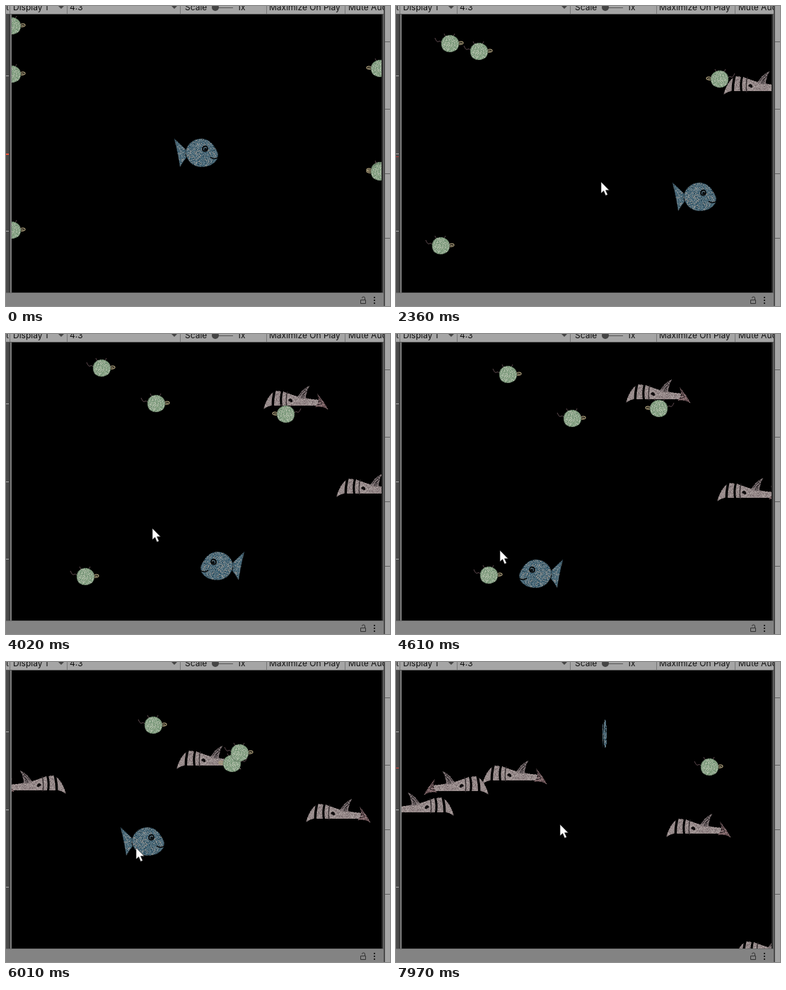
Write an HTML page with a canvas that moves like this. It is 543 by 423 pixels and loops after 8000 ms.

```html
<!DOCTYPE html>
<html lang="en">
<head>
<meta charset="utf-8">
<title>Fish game</title>
<style>
html, body { margin: 0; width: 100%; height: 100%; overflow: hidden; background: #000; }
canvas { display: block; }
</style>
</head>
<body>
<canvas id="stage" width="543" height="423"></canvas>
<script>
const ctx = document.getElementById('stage').getContext('2d');
const LOOP = 8000;
const LEFT = 8, TOP = 12, RIGHT = 531, BOTTOM = 404;

let seed = 7;
const random = () => (seed = seed * 16807 % 2147483647) / 2147483647;

function sprite(draw) {
  const canvas = document.createElement('canvas');
  canvas.width = 110;
  canvas.height = 60;
  const g = canvas.getContext('2d');
  g.translate(55, 30);
  draw(g);
  return canvas;
}

function stroke(g, path, color, width = 1) {
  g.strokeStyle = color;
  g.lineWidth = width;
  g.stroke(new Path2D(path));
}

function fill(g, path, color) {
  g.fillStyle = color;
  g.fill(new Path2D(path));
}

// Fills a path with a base colour and a fine crayon grain.
function crayon(g, path, base, tones) {
  g.save();
  g.clip(new Path2D(path));
  fill(g, path, base);
  for (let i = 0; i < 4000; i++) {
    g.fillStyle = tones[i % tones.length];
    g.fillRect(Math.floor(random() * 110 - 55), Math.floor(random() * 60 - 30), 1, 1);
  }
  g.restore();
}

// Faces right.
const turtle = sprite(g => {
  const shell = 'M-12 0C-12-7-7-12 0-12S13-7 13 0 8 12 0 12-12 7-12 0Z';
  stroke(g, 'M-11-1Q-14-5-16-3T-21-8M-6-10L-8-14M5-10L7-14', '#5d494e');
  stroke(g, 'M11-1C14-4 19-3 19-1S14 2 11 1M13-.5H17', '#a89b78', 1.2);
  crayon(g, shell, '#8aa388', ['#b3c3ac', '#678a6b', '#a0b49b', '#7d9b78', '#bbbfb0']);
  stroke(g, shell, 'rgba(45, 65, 48, .45)');
});

// Faces right.
const fish = sprite(g => {
  const tones = ['#2f5266', '#7d8f96', '#3d6375', '#8c9293', '#22404f', '#969089'];
  const tail = 'M-31-20Q-20-10-14-4Q-16 2-14 7Q-19 13-23 20Q-26 0-31-20Z';
  const body = 'M-15-1C-14-11-5-20 7-20C18-20 25-12 30-1Q32 4 29 10C24 17 17 20 7 20C-5 20-14 11-15-1Z';
  for (const part of [tail, body]) {
    crayon(g, part, '#4f6c7a', tones);
    stroke(g, part, 'rgba(12, 25, 32, .5)');
  }
  stroke(g, 'M20 6Q24 10 30 7', '#05080a', 1.6);
  stroke(g, 'M9-5C9-10 16-11 16-6S9-1 9-5Z', '#080b0d', 1.8);
  fill(g, 'M11-5a2 2 0 0 1 4 0a2 2 0 0 1-4 0Z', '#080b0d');
});

// Faces left.
const shark = sprite(g => {
  const tones = ['#a99d9c', '#857779', '#b1a7a4', '#928183', '#6f6365'];
  crayon(g, 'M-46 16Q-41-2-30-10L-18-9Q2 0 32 3L31 11H-33Q-39 11-46 16Z', '#968a8a', tones);
  crayon(g, 'M2-1Q8-12 19-17Q14-8 14 2Z', '#756a6c', ['#8d8283', '#302b2d']);
  crayon(g, 'M30-6Q38 3 46 17Q38 11 27 13L33 5Z', '#735b5e', ['#8f7174', '#3c2c2f', '#9d8789']);
  stroke(g, 'M5-3L15-14M8-1L15-10M32-2L37 8L30 10', '#262022');
  stroke(g, 'M-30-12Q-33 2-33 15', '#000', 3.5);
  stroke(g, 'M-19-11Q-23 1-20 14', '#000', 3);
  stroke(g, 'M-12-9Q-15 1-13 13', '#2a2425', 1.2);
  fill(g, 'M-11 3Q-8-1-5 3Q-4 7-7 6T-11 3Z', '#100d0e');
});

// Smooth curve through values at the given times, held at both ends.
function curve(times, values) {
  const last = times.length - 1;
  const slope = i => {
    const p = Math.max(0, i - 1), n = Math.min(last, i + 1);
    return (values[n] - values[p]) / (times[n] - times[p]);
  };
  return t => {
    if (t <= times[0]) return values[0];
    if (t >= times[last]) return values[last];
    const i = times.findIndex(k => k > t) - 1;
    const span = times[i + 1] - times[i], u = (t - times[i]) / span;
    const m = slope(i) * span, n = slope(i + 1) * span, d = values[i + 1] - values[i];
    return values[i] + u * (m + u * (3 * d - 2 * m - n + u * (m + n - 2 * d)));
  };
}

// Game time advances in small visible steps between these beats.
const BEATS = [430, 1450, 3330, 4610, 6010, 6830, 7970];
const START = BEATS[0];
function stepped(t) {
  if (t < 500) return START;
  const marks = [...BEATS, LOOP];
  const i = marks.findIndex(k => k > t);
  const a = marks[i - 1], span = marks[i] - a;
  const step = span / Math.max(1, Math.round(span / 73));
  return a + Math.floor((t - a) / step + 1e-6) * step;
}

const fishTimes = [START, 1450, 2500, 3330, 4610, 5250, 6010, 6830, 7500, 7970];
const fishX = curve(fishTimes, [269, 282, 440, 401, 205, 152, 193, 278, 292, 295]);
const fishY = curve(fishTimes, [207, 215, 280, 311, 338, 332, 253, 197, 84, 101]);
const turnTimes = [2600, 5180, 7830];

const pointerFrom = 950;
const pointerX = curve(BEATS.slice(1), [291, 272, 147, 184, 217, 232]);
const pointerY = curve(BEATS.slice(1), [265, 241, 305, 262, 223, 229]);

// Swims in from one side at constant speed (px/s), passing a height on each beat.
function swimmer(image, dir, born, speed, heights) {
  const edge = dir > 0 ? LEFT : RIGHT - 2;
  const beats = BEATS.filter(b => b >= born).slice(0, heights.length);
  const x = t => edge + dir * speed * (t - born) / 1000;
  const y = curve(beats, heights);
  let end = LOOP;
  if (image === turtle) {
    // The fish eats any turtle it reaches.
    for (let t = LOOP; t >= born; t -= 10) {
      if (Math.hypot(x(t) - fishX(t), y(t) - fishY(t)) < 36) end = t;
    }
  }
  return { image, born, end, x, y, flip: image === turtle ? dir : -dir };
}

const swimmers = [
  swimmer(shark, -1, 1990, 60.3, [109, 81, 135, 99, 156]),
  swimmer(shark, -1, 3230, 21.3, [205, 220, 210, 211, 231]),
  swimmer(shark, 1, 4690, 23.5, [170, 155, 171]),
  swimmer(shark, 1, 7200, 36, [201]),
  swimmer(shark, -1, 7780, 26, [404]),
  swimmer(turtle, -1, START, 37.5, [88, 85, 122, 105, 143, 115]),
  swimmer(turtle, -1, START, 58.8, [232, 249]),
  swimmer(turtle, -1, START, 53, [234, 290]),
  swimmer(turtle, 1, START, 29.4, [316, 332, 342, 340]),
  swimmer(turtle, 1, START, 35.9, [28, 57, 44, 57, 89, 62]),
  swimmer(turtle, 1, START, 57.7, [96, 63, 77, 119, 128, 162, 148])
];

function place(image, x, y, scaleX) {
  ctx.save();
  ctx.translate(Math.round(x), Math.round(y));
  ctx.scale(scaleX, 1);
  ctx.drawImage(image, -55, -30);
  ctx.restore();
}

function rect(color, x, y, w, h) {
  ctx.fillStyle = color;
  ctx.fillRect(x, y, w, h);
}

function label(text, x) {
  ctx.font = '12px Inter, sans-serif';
  ctx.fillStyle = '#111';
  ctx.fillText(text, x, 6);
}

// Slivers of the neighbouring panel: from, colour, y, height
const slivers = [
  [0, '#f0563c', 208, 2],
  [1310, '#b03a34', 212, 1],
  [3000, '#b5f535', 182, 8],
  [3830, '#4a4a4a', 140, 1],
  [6330, '#d8473c', 200, 1],
  [7140, '#d8473c', 149, 1]
];

function drawChrome(t) {
  rect('#4a4a4a', 0, 12, 4, 392);
  rect('#3a3a3a', 4, 12, 2, 392);
  rect('#7b7b7b', 6, 12, 2, 392);
  for (const y of [98, 208, 317]) rect('#aaa', 0, y, 4, 1);
  rect('#282828', 531, 12, 2, 392);
  rect('#6e6e6e', 533, 12, 2, 392);
  const [, color, y, h] = slivers.filter(s => s[0] <= t).pop();
  rect(color, 0, y, 4, h);

  rect('#838383', 0, 404, 535, 19);
  rect('#6c6c6c', 0, 404, 535, 1);
  stroke(ctx, 'M501.5 414.5h7v5h-7ZM507.5 414v-2a2 2 0 0 0-4 0', '#333');
  for (const dot of [410, 414, 418]) rect('#222', 520, dot, 2, 2);

  rect('#a5a5a5', 0, 0, 535, 11);
  rect('#555', 0, 11, 535, 1);
  for (const x of [5, 86, 246, 368, 479]) rect('#777', x, 0, 1, 11);
  label('t', 0);
  label('Display 1', 10);
  label('4:3', 90);
  label('Scale', 253);
  label('1x', 327);
  label('Maximize On Play', 372);
  label('Mute Audio', 484);
  for (const x of [78, 238]) fill(ctx, `M${x - 4} 0h8l-4 4Z`, '#444');
  rect('#555', 296, 2, 25, 1);
  fill(ctx, 'M291 2a5 5 0 0 1 10 0a5 5 0 0 1-10 0Z', '#444');

  rect('#4b4b4b', 534, 0, 2, 423);
  rect('#a5a5a5', 536, 0, 7, 423);
  for (const line of [50, 145, 236, 327]) rect('#606060', 536, line, 7, 1);
}

function drawPointer(x, y) {
  const arrow = 'M0 0V16L3.7 12.7L6.5 19.3L9.3 18L6.5 11.8H11.5Z';
  ctx.save();
  ctx.translate(Math.round(x), Math.round(y));
  fill(ctx, arrow, '#fff');
  stroke(ctx, arrow, '#222', 0.6);
  ctx.restore();
}

function render(t) {
  const s = stepped(t);
  rect('#000', 0, 0, 543, 423);
  drawChrome(t);
  ctx.save();
  ctx.beginPath();
  ctx.rect(LEFT, TOP, RIGHT - LEFT, BOTTOM - TOP);
  ctx.clip();
  for (const { image, born, end, x, y, flip } of swimmers) {
    if (s >= born && s < end) place(image, x(s), y(s), flip);
  }
  const facing = turnTimes.reduce((f, from) =>
    f * Math.cos(Math.PI * Math.min(1, Math.max(0, (s - from) / 300))), 1);
  place(fish, fishX(s), fishY(s), facing);
  if (s >= pointerFrom) drawPointer(pointerX(s), pointerY(s));
  ctx.restore();
}

const begin = performance.now();
function tick() {
  render((performance.now() - begin) % LOOP);
  requestAnimationFrame(tick);
}
tick();
</script>
</body>
</html>
```
